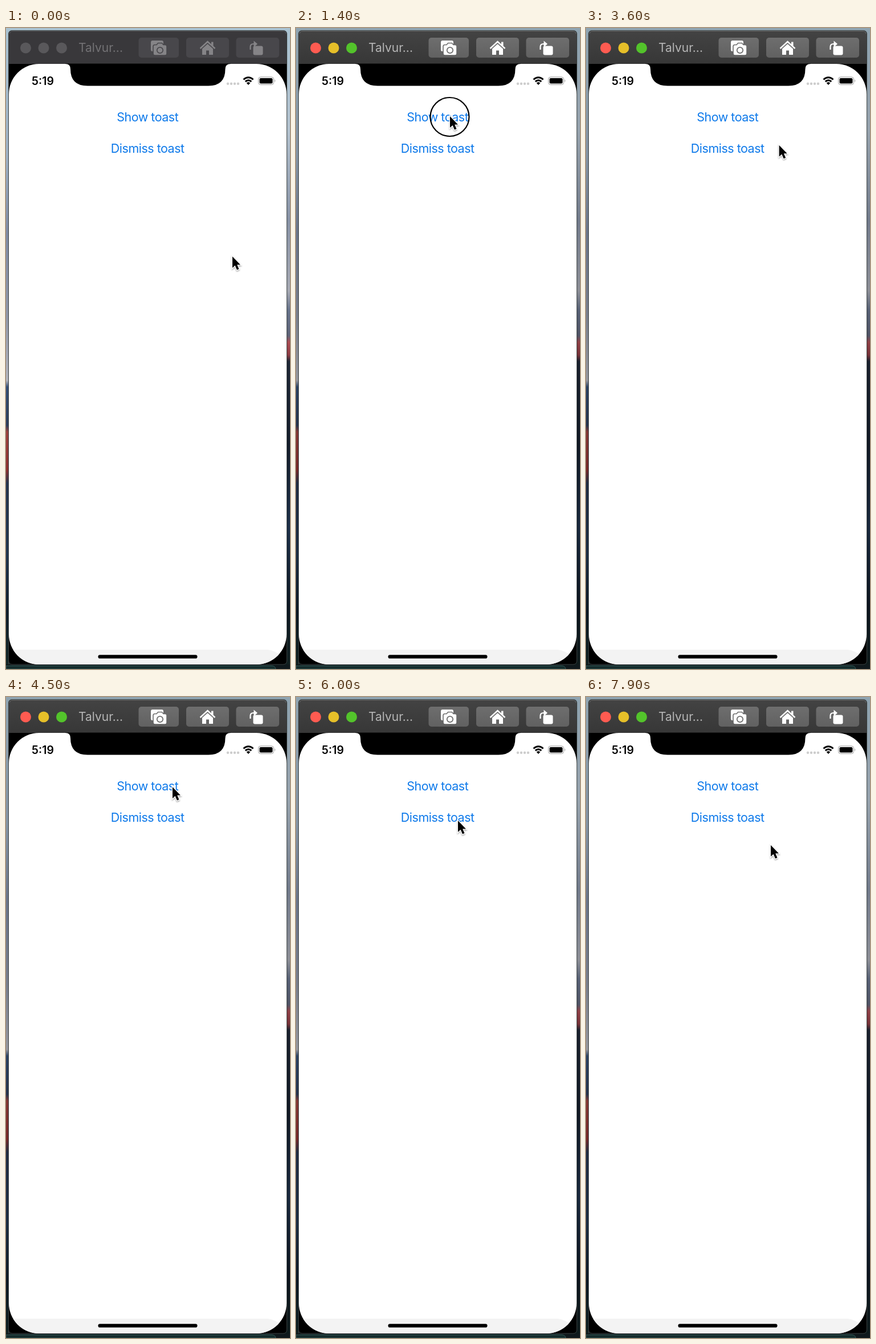
An HTML page for the animation above (8000 ms loop, 498 by 1125 pixels).

```html
<!DOCTYPE html>
<html lang="en">
<head>
<meta charset="utf-8">
<title>Toast demo</title>
<style>
  html, body { margin: 0; width: 100%; height: 100%; overflow: hidden; background: #101a22; }
  svg { display: block; width: 100vw; height: 100vh; }
  text { font-family: Inter, "Open Sans", sans-serif; }
  .label { font-size: 21.5px; letter-spacing: -.5px; text-anchor: middle; }
  .link { fill: #0f7aea; }
  #chrome { --bar: #39383b; --title: #737275; --button: #48474b; --icon: #858487; --edge: #5c5c5f; }
  #chrome.active { --bar: url(#barFill); --title: #b6b6b6; --button: url(#buttonFill); --icon: #fff; --edge: #6d6d6d; }
  .bar { fill: var(--bar); }
  .title { fill: var(--title); font-size: 21px; }
  .button { fill: var(--button); }
  .icon { fill: var(--icon); }
  .iconLine { fill: none; stroke: var(--icon); }
  .cut { fill: var(--icon); stroke: var(--button); }
  .light { fill: #59585b; }
  .active .red { fill: #ff5b51; }
  .active .yellow { fill: #e6bf29; }
  .active .green { fill: #53c32b; }
</style>
</head>
<body>
<svg viewBox="0 0 498 1125" preserveAspectRatio="none">
  <defs>
    <linearGradient id="wallLeft" x2="0" y2="1">
      <stop offset="0" stop-color="#a9c2d1"/>
      <stop offset=".2" stop-color="#9db0c3"/>
      <stop offset=".32" stop-color="#7f8ba4"/>
      <stop offset=".45" stop-color="#9097a8"/>
      <stop offset=".55" stop-color="#b1b3bb"/>
      <stop offset=".56" stop-color="#344f76"/>
      <stop offset=".62" stop-color="#2b3d5b"/>
      <stop offset=".63" stop-color="#9b423e"/>
      <stop offset=".69" stop-color="#8b302f"/>
      <stop offset=".71" stop-color="#26364f"/>
      <stop offset=".82" stop-color="#203650"/>
      <stop offset=".91" stop-color="#101d2b"/>
      <stop offset="1" stop-color="#122725"/>
    </linearGradient>
    <linearGradient id="wallRight" x2="0" y2="1">
      <stop offset="0" stop-color="#a9c2d1"/>
      <stop offset=".16" stop-color="#b3c2cf"/>
      <stop offset=".3" stop-color="#8792a6"/>
      <stop offset=".41" stop-color="#a6a9b3"/>
      <stop offset=".44" stop-color="#66728b"/>
      <stop offset=".48" stop-color="#5d6378"/>
      <stop offset=".49" stop-color="#a94b52"/>
      <stop offset=".51" stop-color="#8d3a42"/>
      <stop offset=".52" stop-color="#1d2635"/>
      <stop offset=".65" stop-color="#131c2a"/>
      <stop offset=".78" stop-color="#1c2f48"/>
      <stop offset=".9" stop-color="#0d1723"/>
      <stop offset="1" stop-color="#10201f"/>
    </linearGradient>
    <linearGradient id="barFill" x2="0" y2="1">
      <stop offset="0" stop-color="#434343"/>
      <stop offset="1" stop-color="#373737"/>
    </linearGradient>
    <linearGradient id="buttonFill" x2="0" y2="1">
      <stop offset="0" stop-color="#6e6e6e"/>
      <stop offset="1" stop-color="#616161"/>
    </linearGradient>
    <filter id="cardShadow" x="-20%" y="-20%" width="140%" height="140%">
      <feDropShadow dx="0" dy="0" stdDeviation="2" flood-opacity=".27"/>
    </filter>
    <filter id="cursorShadow" x="-50%" y="-50%" width="200%" height="200%">
      <feDropShadow dx="0" dy="1.5" stdDeviation="1.3" flood-opacity=".4"/>
    </filter>
    <clipPath id="screen"><rect x="5" y="63" width="487" height="1054" rx="53"/></clipPath>
  </defs>

  <!-- Desktop -->
  <rect width="250" height="1125" fill="url(#wallLeft)"/>
  <rect x="250" width="248" height="1125" fill="url(#wallRight)"/>
  <rect id="windowShadow" width="498" height="1125" fill="#000" opacity="0"/>
  <rect y="1117" width="498" height="8" fill="#10191c"/>
  <path d="M0 1119.5H466Q472 1119.5 473 1125H0Z" fill="#142b2b" stroke="#345b57"/>

  <!-- Window -->
  <g id="chrome">
    <path d="M4.5 1117V11Q4.5 4.5 11 4.5H486Q492.5 4.5 492.5 11V1110Q492.5 1117 486 1117H11Q4.5 1117 4.5 1110Z" fill="#000" stroke="#3a4040"/>
    <path class="bar" d="M5 63V11Q5 5 11 5H486Q492 5 492 11V63Z"/>
    <path class="iconLine" d="M6 10Q7 5.5 11 5.5H486Q490 5.5 491 10" style="stroke: var(--edge)"/>
    <circle class="light red" cx="34.5" cy="35" r="9.5"/>
    <circle class="light yellow" cx="66" cy="35" r="9.5"/>
    <circle class="light green" cx="97.5" cy="35" r="9.5"/>
    <text class="title" x="127" y="42">Talvur...</text>
    <rect class="button" x="232.5" y="17" width="70.5" height="35" rx="5"/>
    <rect class="button" x="316" y="17" width="75" height="35" rx="5"/>
    <rect class="button" x="403.5" y="17" width="75.5" height="35" rx="5"/>

    <path class="icon" d="M257 22H273Q276 22 276 25V38Q276 41 273 41H257Q254 41 254 38V25Q254 22 257 22Z"/>
    <path class="cut" stroke-width="1.6" d="M261 29.5H264L266.5 26.5H273.5L276 29.5H279Q282 29.5 282 32.5V45Q282 48 279 48H261Q258 48 258 45V32.5Q258 29.5 261 29.5Z"/>
    <circle class="cut" stroke-width="1.7" cx="270" cy="39" r="5.2"/>

    <path class="iconLine" stroke-width="2.4" d="M340.5 36L353.5 24L366.5 36"/>
    <path class="icon" d="M360 24.5H363.5V32L360 29ZM344 36.5L353.5 28L363 36.5V47H356V39.5H351V47H344Z"/>

    <rect class="icon" x="433.5" y="31.5" width="17" height="16" rx="3"/>
    <path class="iconLine" stroke-width="2.2" d="M428.5 38V33Q428.5 28 433.5 28H436"/>
    <path class="icon" d="M434.5 22.5L441 28L434.5 33.5Z"/>
  </g>

  <!-- Device screen -->
  <g clip-path="url(#screen)">
    <rect x="5" y="63" width="487" height="1054" fill="#fff"/>
    <path d="M5 1091H458Q473 1092 483 1104V1117H5Z" fill="#f3f3f3"/>
  </g>
  <path d="M104 62.5V63Q113 63 113 72Q113 101.500 143 101.500H355Q384.500 101.500 384.500 72Q384.500 63 394 63V62.500Z"/>
  <rect x="161.500" y="1100.300" width="174" height="6.200" rx="3.100"/>
  <text x="45" y="100" font-size="19.5" font-weight="600">5:19</text>
  <g fill="#cdcdcd">
    <circle cx="389" cy="97.700" r="2.200"/><circle cx="395" cy="97.700" r="2.200"/>
    <circle cx="401" cy="97.700" r="2.200"/><circle cx="407" cy="97.700" r="2.200"/>
  </g>
  <path d="M416.500 90.500Q425 83 433.500 90.500M419.700 94Q425 89.500 430.300 94" fill="none" stroke="#000" stroke-width="3"/>
  <path d="M421.700 96.500Q425 93.500 428.300 96.500L425 100Z"/>
  <rect x="442.500" y="86" width="27" height="13.500" rx="4" fill="none" stroke="#999"/>
  <rect x="444.500" y="88" width="23" height="9.500" rx="2.300"/>
  <path d="M471.300 90.500Q473.500 92.700 471.300 95Z" fill="#999"/>

  <g id="links">
    <text class="label link" x="248.2" y="163.500">Show toast</text>
    <text class="label link" x="248.2" y="219.300">Dismiss toast</text>
  </g>

  <g id="toast" opacity="0">
    <rect x="163.500" y="536" width="170" height="121" rx="14" fill="#fff" filter="url(#cardShadow)"/>
    <circle cx="248.400" cy="575.200" r="12.300" fill="none" stroke="#000" stroke-width="2"/>
    <path d="M242.800 576.300L246.700 580.600L253.600 569.700" fill="none" stroke="#000" stroke-width="2" stroke-linecap="round" stroke-linejoin="round"/>
    <text class="label" x="248.400" y="623.300">Hello world!</text>
  </g>

  <circle id="ring" r="34" fill="none" stroke="#000" stroke-width="2.200"/>
  <g id="cursor" filter="url(#cursorShadow)">
    <path d="M0 0V20L4.600 15.800L8 23.500L11.500 22L8.200 14.500H14Z" stroke="#fff" stroke-width="2.400" paint-order="stroke"/>
  </g>
</svg>
<script>
  const LOOP = 8000, STEP = 100, ACTIVATE = 1300;
  const $ = id => document.getElementById(id);

  // Cursor stops: time, x, y
  const stops = [
    [0, 397, 401], [1200, 270, 155], [1500, 270, 155], [2200, 340, 207],
    [3500, 340, 207], [4500, 292, 158], [4900, 292, 158], [5400, 288, 199],
    [6000, 284, 217], [6500, 284, 217], [7300, 324, 260], [LOOP, 324, 260]
  ];
  const clicks = [[1300, 1500], [4600, 4800], [5500, 5600]];
  const toasts = [[1500, 2800], [4800, 5600]];
  const FADE = 300;

  const clamp = v => Math.max(0, Math.min(1, v));
  const ease = p => p * p * (3 - 2 * p);

  function cursorAt(t) {
    const i = stops.findIndex(stop => stop[0] > t);
    const [t0, x0, y0] = stops[i - 1], [t1, x1, y1] = stops[i];
    const p = ease((t - t0) / (t1 - t0));
    return [x0 + (x1 - x0) * p, y0 + (y1 - y0) * p];
  }

  const toastOpacity = t => Math.max(...toasts.map(([show, hide]) =>
    ease(clamp((t - show) / FADE)) * (1 - ease(clamp((t - hide) / FADE)))));

  function render(t) {
    const [x, y] = cursorAt(t);
    const opacity = toastOpacity(t);
    const active = t >= ACTIVATE;
    const pressed = clicks.some(([down, up]) => t >= down && t < up);
    $('chrome').classList.toggle('active', active);
    $('windowShadow').setAttribute('opacity', active ? .16 : 0);
    $('cursor').setAttribute('transform', `translate(${x} ${y})`);
    $('ring').setAttribute('transform', `translate(${x - .5} ${y + 1})`);
    $('ring').setAttribute('visibility', pressed ? 'visible' : 'hidden');
    $('toast').setAttribute('opacity', opacity);
    $('links').setAttribute('transform', `translate(${opacity > 0 ? .5 : 0} 0)`);
  }

  const start = performance.now();
  function tick() {
    const t = (performance.now() - start) % LOOP;
    render(Math.floor(t / STEP) * STEP);
    requestAnimationFrame(tick);
  }
  tick();
</script>
</body>
</html>
```
